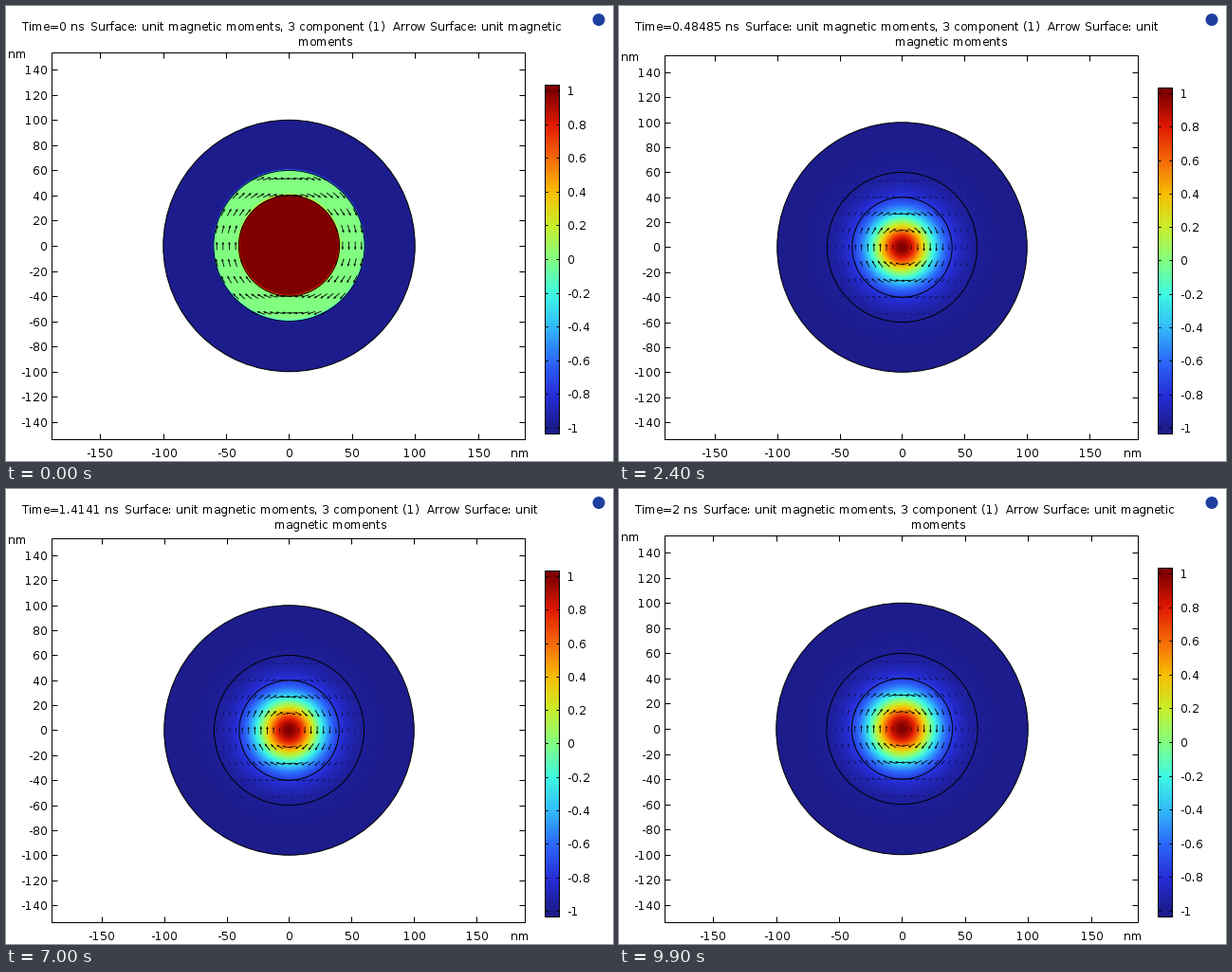
A matplotlib script that plays this animation: 640x480 px, repeating every 10 s.

```python
import numpy as np
import matplotlib.pyplot as plt
from matplotlib.animation import FuncAnimation
from matplotlib.colors import LinearSegmentedColormap
from matplotlib.patches import Circle, Rectangle
from matplotlib.textpath import TextPath

W, H, DPI = 640, 480, 64
FRAMES, END_TIME = 100, 2.0
PX = 72 / DPI  # one pixel in points
LEFT, RIGHT, BOTTOM, CX = 48, 547, 457, 298.5
BAR_LEFT, BAR_RIGHT, BAR_BOTTOM, LIMIT = 568, 583, 451, 1.034

plt.rcParams.update({
    "font.family": "DejaVu Sans",
    "font.size": 12 * PX,
    "text.hinting": "native",
    "text.hinting_factor": 1,
})

STOPS = [
    (-1.0, (28, 28, 140)), (-0.8, (38, 46, 216)), (-0.6, (44, 104, 250)),
    (-0.4, (50, 186, 250)), (-0.2, (62, 250, 226)), (0.0, (130, 255, 130)),
    (0.2, (200, 238, 44)), (0.4, (248, 190, 4)), (0.6, (246, 106, 8)),
    (0.8, (226, 26, 2)), (1.0, (128, 0, 0)),
]
cmap = LinearSegmentedColormap.from_list(
    "rainbow_dark",
    [((v + 1) / 2, tuple(c / 255 for c in rgb)) for v, rgb in STOPS], N=512)

fig = plt.figure(figsize=(W / DPI, H / DPI), dpi=DPI, facecolor="white")
ax = fig.add_axes([0, 0, 1, 1])
ax.set_axis_off()
ax.set_xlim(0, W)
ax.set_ylim(H, 0)


def label(x, baseline, text, ha="left"):
    return ax.text(x, baseline, text, ha=ha, va="baseline", color="black",
                   zorder=6)


def picture(data, extent, zorder):
    return ax.imshow(data, extent=extent, cmap=cmap, vmin=-1, vmax=1,
                     aspect="auto", interpolation="bilinear", zorder=zorder)


def box(x0, y0, x1, y1):
    return ax.add_patch(Rectangle((x0, y0), x1 - x0, y1 - y0, fill=False,
                                  ec="black", lw=PX, zorder=5))


class Layout:
    """Axes, outlines and colour bar for one height of the plot area."""

    def __init__(self, top):
        self.cy = (top + BOTTOM) / 2
        self.scale = (BOTTOM - top) * 0.003253
        self.rings = [
            ax.add_patch(Circle((CX, self.cy), r * self.scale, fill=False,
                                ec="black", lw=PX, zorder=4))
            for r in (100, 60, 40)
        ]
        self.parts = [*self.rings, box(LEFT, top, RIGHT, BOTTOM),
                      label(2, top + 6, "nm"), label(532, 476, "nm")]
        self.axis_ticks(top)
        self.color_bar(top + 34)

    def axis_ticks(self, top):
        for v in range(-140, 141, 20):
            y = round(self.cy - v * self.scale)
            self.ticks([(LEFT, y, LEFT + 6, y), (RIGHT - 6, y, RIGHT, y)])
            self.parts.append(label(44, y + 5, str(v), "right"))
        for v in range(-150, 151, 50):
            x = round(CX + v * self.scale)
            self.ticks([(x, top, x, top + 6), (x, BOTTOM - 6, x, BOTTOM)])
            self.parts.append(label(x + 0.5, 476, str(v), "center"))

    def color_bar(self, top):
        ramp = np.linspace(LIMIT, -LIMIT, 400)[:, None]
        self.parts += [
            picture(ramp, (BAR_LEFT, BAR_RIGHT + 1, BAR_BOTTOM + 1, top), 2),
            box(BAR_LEFT, top, BAR_RIGHT, BAR_BOTTOM),
        ]
        mid, unit = (top + BAR_BOTTOM) / 2, (BAR_BOTTOM - top) / 2 / LIMIT
        for i in range(-5, 6):
            y = round(mid - i / 5 * unit)
            self.ticks([(BAR_LEFT, y, BAR_LEFT + 3, y),
                        (BAR_RIGHT - 3, y, BAR_RIGHT, y)])
            self.parts.append(label(592, y + 5, f"{i / 5:g}"))

    def ticks(self, segments):
        for x0, y0, x1, y1 in segments:
            self.parts += ax.plot([x0, x1], [y0, y1], color="black", lw=PX,
                                  solid_capstyle="butt", zorder=5)

    def show(self, on):
        for part in self.parts:
            part.set_visible(on)


def moment_z(r, n):
    """Out-of-plane moment: a stepped start relaxing to a breathing skyrmion."""
    radius = 22.5 + 33.2 * np.exp(-n / 20) * np.cos(np.pi * (n / 50 + 0.05))
    width = 20 + 4 * np.exp(-n / 20)
    a, b = np.sinh(radius / width) ** 2, np.sinh(r / width) ** 2
    wall = (a - b) / (a + b)
    d = 0.6 + 7 * np.sqrt(n)
    step = -0.5 * (np.tanh((r - 40) / d) + np.tanh((r - 60) / d))
    mix = np.exp(-n / 2)
    return mix * step + (1 - mix) * wall


wide, narrow = Layout(49), Layout(52)
ax.add_patch(Circle((625, 14.5), 6.5, color="#1f3f9f", lw=0, zorder=6))

side = np.linspace(-101, 101, 540)
disc_r = np.hypot(*np.meshgrid(side, side))
disc = picture(moment_z(disc_r, 0), (0, 1, 1, 0), 1)

gx, gy = np.meshgrid((np.arange(-20, 20) + 0.5) * 5, np.arange(-7, 8) * 40 / 3)
gr = np.hypot(gx, gy)
inside = gr < 99
gx, gy, gr = gx[inside], gy[inside], gr[inside]

SUBJECT = "Surface: unit magnetic moments, 3 component (1)  Arrow Surface: unit"
HEADS = {
    wide: (SUBJECT + " magnetic", "moments"),
    narrow: (SUBJECT, "magnetic moments"),
}
advances = {}
moving = []


def ink(text):
    return TextPath((0, 0), text, size=12).get_extents().width


def advance(char):
    """Glyph advance rounded to whole pixels."""
    if char not in advances:
        advances[char] = round(ink(f"|{char}|") - ink("||"))
    return advances[char]


def run_width(text):
    return sum(map(advance, text))


def draw_run(x, baseline, text):
    for char in text:
        if char != " ":
            moving.append(label(x, baseline, char))
        x += advance(char)
    return x


def draw_title(layout, n):
    head, tail = HEADS[layout]
    time = f"Time={n * END_TIME / (FRAMES - 1):.5g} ns"
    start = draw_run(17, 26, time) + 7
    draw_run(start, 26, head)
    draw_run(start + (run_width(head) - run_width(tail)) // 2 - 1, 42, tail)


def draw_arrows(layout, n):
    size = np.sqrt(np.clip(1 - moment_z(gr, n) ** 2, 0, 1))
    k = size > 0.15
    length = 9 * size[k] / gr[k]
    moving.append(ax.quiver(
        CX + gx[k] * layout.scale, layout.cy - gy[k] * layout.scale,
        gy[k] * length, -gx[k] * length, pivot="mid", color="black",
        units="dots", scale_units="dots", scale=1, width=0.85, headwidth=3,
        headlength=3.5, headaxislength=3.5, minshaft=3, minlength=0,
        zorder=3))


def update(n):
    while moving:
        moving.pop().remove()
    layout = wide if n in (0, FRAMES - 1) else narrow
    wide.show(layout is wide)
    narrow.show(layout is narrow)
    half = 101 * layout.scale
    disc.set_data(moment_z(disc_r, n))
    disc.set_extent((CX - half, CX + half, layout.cy + half, layout.cy - half))
    disc.set_clip_path(layout.rings[0])
    draw_arrows(layout, n)
    draw_title(layout, n)
    return []


anim = FuncAnimation(fig, update, frames=FRAMES, init_func=lambda: [],
                     interval=100, repeat=True, repeat_delay=0, blit=False)
plt.show()
```
